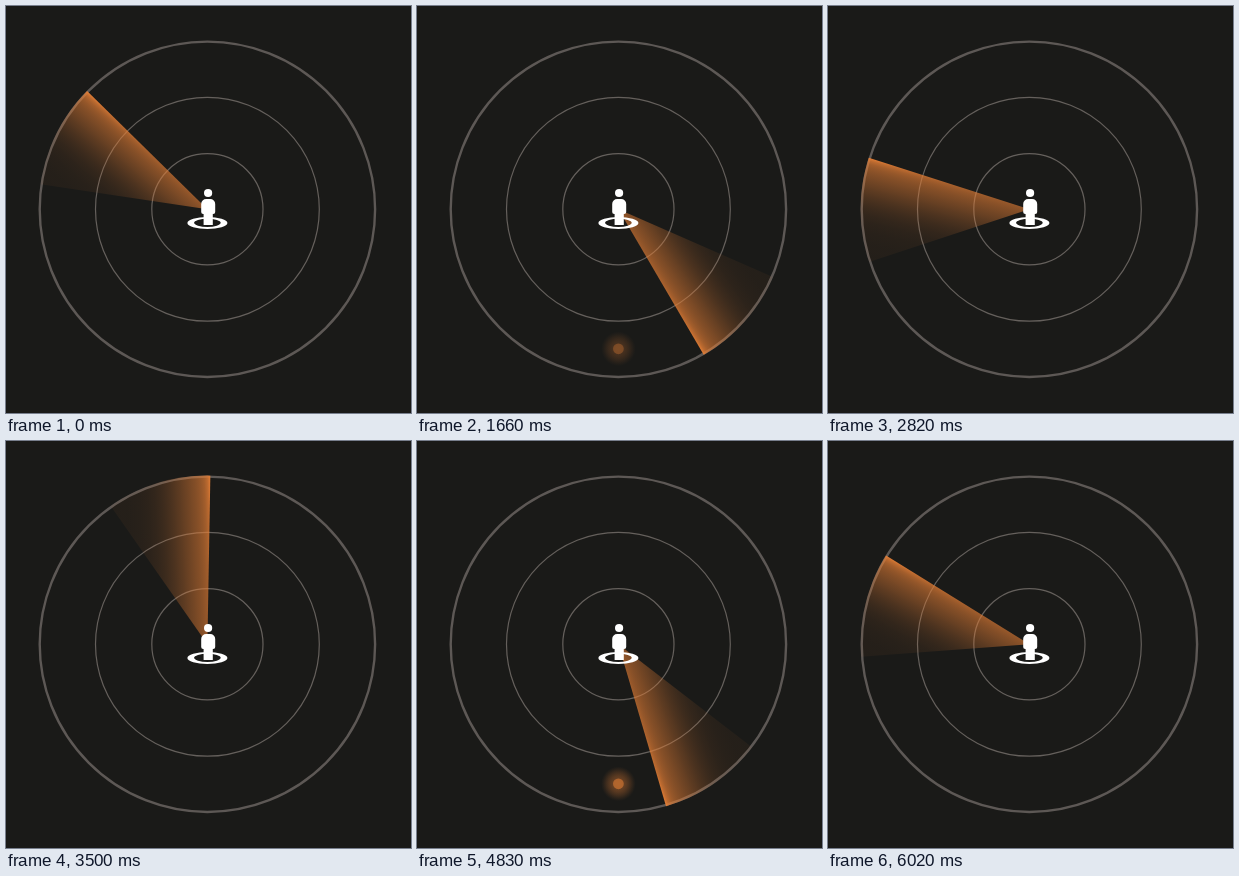
An HTML page with a canvas for the animation above (6080 ms loop, 405x407 px).

```html
<!DOCTYPE html>
<html lang="en">
<head>
<meta charset="utf-8">
<title>Radar sweep</title>
<style>
html, body { margin: 0; width: 100%; height: 100%; overflow: hidden; background: #1a1a18; }
canvas { display: block; }
</style>
</head>
<body>
<canvas id="radar" width="405" height="407"></canvas>
<script>
const ctx = document.getElementById('radar').getContext('2d');
const LOOP = 6080, TICKS = 88, TICK = LOOP / TICKS;
const START = 314.5, TURN = 8.13;   // degrees clockwise from the top, per tick
const R = 167.7, WEDGE = 36, BLIP_Y = 139.5;
const BG = '#1a1a18';

const rad = deg => deg * Math.PI / 180;
const clamp = x => Math.max(0, Math.min(1, x));
const orange = alpha => `rgba(226,125,53,${alpha})`;

// Fills a gradient with orange whose opacity follows a function of 0..1
function fade(gradient, alpha) {
  for (let p = 0; p <= 1; p += 1 / 32) gradient.addColorStop(p, orange(alpha(p).toFixed(3)));
  return gradient;
}

function circle(x, y, r) {
  ctx.beginPath();
  ctx.arc(x, y, r, 0, 2 * Math.PI);
}

function disc(x, y, r, fill) {
  circle(x, y, r);
  ctx.fillStyle = fill;
  ctx.fill();
}

function ring(r, width, color) {
  circle(0, 0, r);
  ctx.lineWidth = width;
  ctx.strokeStyle = color;
  ctx.stroke();
}

// A bright leading edge over a broad soft tail
const tail = p => .42 * Math.exp(-p / .05) + .53 * Math.exp(-((p / .4) ** 2)) + .05;

function sweep(angle) {
  ctx.save();
  ctx.rotate(rad(angle - 90));
  ctx.beginPath();
  ctx.moveTo(0, 0);
  ctx.arc(0, 0, R + 1, rad(-WEDGE), 0);
  ctx.closePath();
  ctx.fillStyle = fade(ctx.createLinearGradient(R, 0, R - 6, -100), tail);
  ctx.fill();
  ctx.restore();
}

function blip(angle) {
  const past = angle % 360 - 180;
  ctx.globalAlpha = clamp((past + 50) / 50) * clamp((100 - past) / 50);
  const glow = ctx.createRadialGradient(0, BLIP_Y, 0, 0, BLIP_Y, 17.5);
  disc(0, BLIP_Y, 17.5, fade(glow, p => .65 * (1 - p * p) ** 1.4));
  disc(0, BLIP_Y, 5.4, orange(.85));
  ctx.globalAlpha = 1;
}

function person() {
  disc(.7, -16.3, 4.1, '#fff');
  ctx.beginPath();
  ctx.ellipse(0, 13.7, 20, 6.1, 0, 0, 2 * Math.PI);
  ctx.ellipse(0, 13.5, 13.3, 4.1, 0, 0, 2 * Math.PI);
  ctx.fill('evenodd');
  ctx.beginPath();
  ctx.roundRect(-6.2, -10.3, 14, 15, [5, 5, 2, 2]);
  ctx.rect(-3.8, 2, 9.2, 13.7);
  ctx.fill();
}

function draw(now) {
  const tick = Math.floor((now % LOOP + 18) / TICK) % TICKS;
  const angle = START + TURN * tick;
  ctx.fillStyle = BG;
  ctx.fillRect(0, 0, 405, 407);
  ctx.save();
  ctx.translate(201.4, 203.3);
  ring(R, 2.4, '#5d5855');
  ring(111.9, 1.2, '#65605c');
  ring(55.6, 1.2, '#65605c');
  sweep(angle);
  blip(angle);
  person();
  ctx.restore();
}

const begin = performance.now();
function frame() {
  draw(performance.now() - begin);
  requestAnimationFrame(frame);
}
frame();
</script>
</body>
</html>
```
